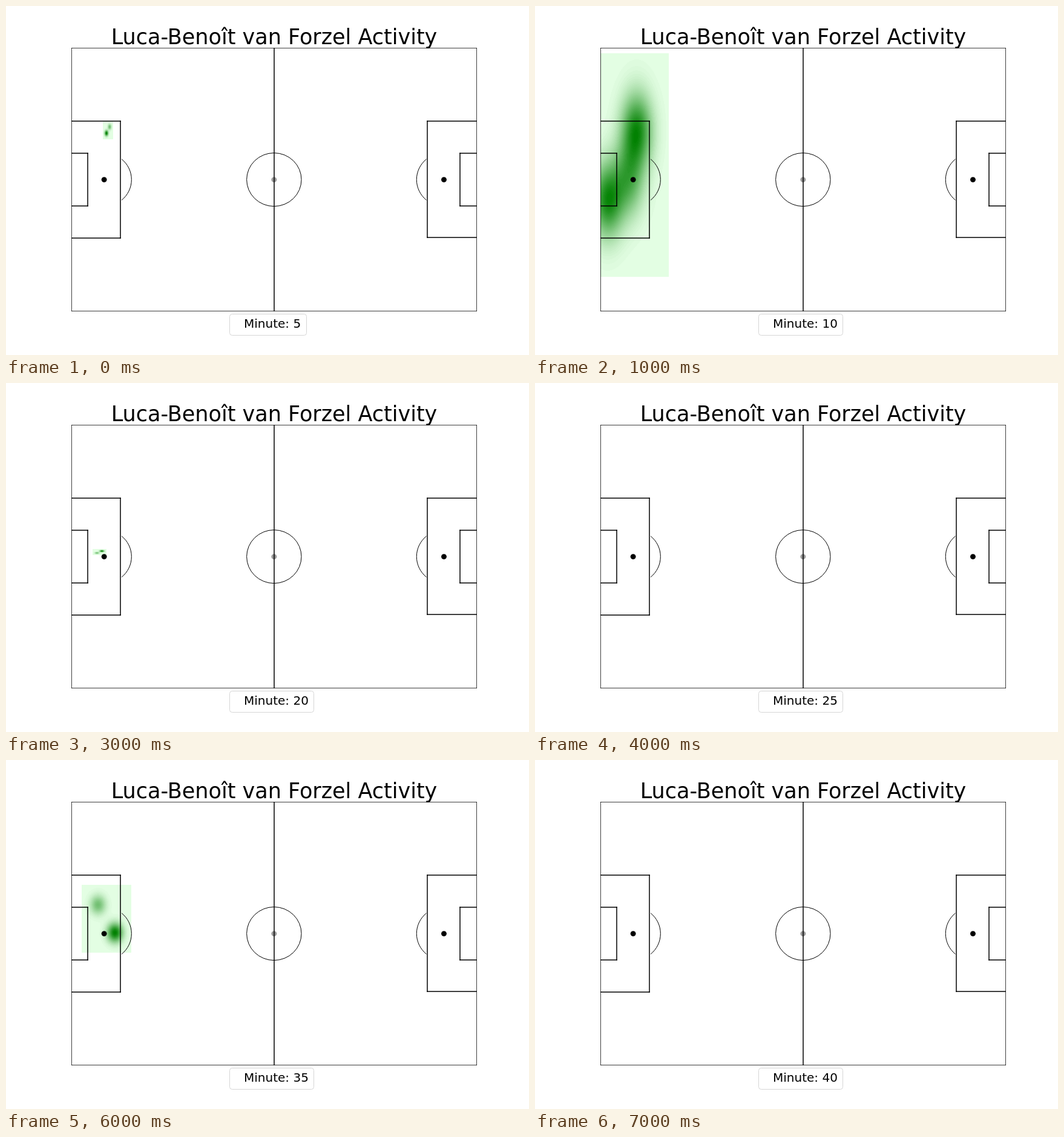
Animation, 864 px wide and 576 px high, one loop 8 s. Source, as an HTML page with a canvas:

```html
<!DOCTYPE html>
<html lang="en">
<head>
<meta charset="utf-8">
<title>Activity map</title>
<style>
  html, body { margin: 0; width: 100%; height: 100%; overflow: hidden; background: #fff; }
  #stage { position: relative; width: 864px; height: 576px; overflow: hidden; }
  canvas, svg { position: absolute; left: 0; top: 0; }
  text { font-family: "DejaVu Sans", sans-serif; }
  .turn { visibility: hidden; animation: turn 8s step-end infinite; }
  @keyframes turn {
    0% { visibility: visible; }
    12.5%, 100% { visibility: hidden; }
  }
</style>
</head>
<body>
<div id="stage">
  <svg id="pitch" width="864" height="576" fill="none" stroke="#000">
    <clipPath id="field"><rect x="108" y="69" width="670" height="435"/></clipPath>
    <ellipse cx="442.8" cy="286.56" rx="4.46" ry="4.36" fill="#999" stroke="none"/>
    <g clip-path="url(#field)" stroke-width="1.5" stroke-linecap="square">
      <path d="M108 69H778M108 504H778M108 190H189M108 383H189M108 243H135M108 330H135
               M778 190H696M778 382H696M778 243H750M778 330H750"/>
      <path d="M108 69V504M778 69V504M443 69V504M189 190V383M135 243V330M696 190V382M750 243V330"/>
    </g>
    <ellipse cx="442.8" cy="286.56" rx="45.2" ry="44.03"/>
    <path d="M191.18 252.83A45.2 44.03 0 0 1 191.18 320.29M694.42 252.83A45.2 44.03 0 0 0 694.42 320.29"/>
    <g fill="#000" stroke="none">
      <ellipse cx="162.13" cy="286.56" rx="4.46" ry="4.36"/>
      <ellipse cx="723.47" cy="286.56" rx="4.46" ry="4.36"/>
      <text x="443" y="63" font-size="35" text-anchor="middle">Luca-Benoît van Forzel Activity</text>
    </g>
  </svg>
</div>
<script>
const stage = document.getElementById('stage');
const pitch = document.getElementById('pitch');
const LEVELS = 50;

// One entry per second: kernel width and [x, y, weight] points.
const scenes = [
  { bw: [2, 3.2], pts: [[166, 209.9, 2], [171.2, 199.5, 1]] },
  { bw: [17.7, 42.3], pts: [[168, 205, 1], [120, 320, 1], [155, 285, 0.65]] },
  { bw: [2.5, 1.15], pts: [[150.3, 280.5, 2], [158.4, 277.4, 1]] },
  { bw: [2.5, 1.15], pts: [[150.3, 280.5, 1], [158.4, 277.4, 2]] },
  null,
  { bw: [12, 9.7], pts: [[192, 272.1, 2], [157, 299, 2], [164, 303, 2], [114, 305, 1]] },
  { bw: [9, 11], pts: [[152, 239, 1], [180, 285, 2]] },
  null
];

function schedule(el, i) {
  el.classList.add('turn');
  el.style.animationDelay = (i ? i - 8 : 0) + 's';
}

function heat({ bw: [bx, by], pts }) {
  const xs = pts.map(p => p[0]), ys = pts.map(p => p[1]);
  const left = Math.max(108, Math.round(Math.min(...xs) - 3 * bx));
  const top = Math.round(Math.min(...ys) - 3 * by);
  const w = Math.round(Math.max(...xs) + 3 * bx) - left;
  const h = Math.round(Math.max(...ys) + 3 * by) - top;
  const density = (x, y) => pts.reduce((sum, [px, py, k]) =>
    sum + k * Math.exp(-(((x - px) / bx) ** 2 + ((y - py) / by) ** 2) / 2), 0);

  const values = Array.from({ length: w * h }, (_, i) =>
    density(left + i % w + 0.5, top + Math.floor(i / w) + 0.5));
  const peak = values.reduce((a, b) => Math.max(a, b), 0);

  const canvas = document.createElement('canvas');
  canvas.width = w;
  canvas.height = h;
  canvas.style.left = left + 'px';
  canvas.style.top = top + 'px';
  const ctx = canvas.getContext('2d');
  const img = ctx.createImageData(w, h);
  values.forEach((v, i) => {
    const band = Math.min(LEVELS - 1, Math.floor(v / peak * LEVELS));
    const t = (band + 0.5) / LEVELS;
    const pale = 229 * (1 - t);
    img.data.set([pale, 255 - 127 * t, pale, 255], i * 4);
  });
  ctx.putImageData(img, 0, 0);
  return canvas;
}

function legend(minute) {
  const g = document.createElementNS('http://www.w3.org/2000/svg', 'g');
  const width = minute < 10 ? 127 : 139;
  g.innerHTML =
    `<rect x="369.5" y="508.5" width="${width}" height="35" rx="4" fill="#fff" stroke="#d6d6d6"/>` +
    `<text x="393" y="531" font-size="20" fill="#000" stroke="none">Minute: ${minute}</text>`;
  return g;
}

scenes.forEach((scene, i) => {
  if (scene) {
    const map = heat(scene);
    schedule(map, i);
    stage.insertBefore(map, pitch);
  }
  const label = legend(5 * (i + 1));
  schedule(label, i);
  pitch.append(label);
});
</script>
</body>
</html>
```
